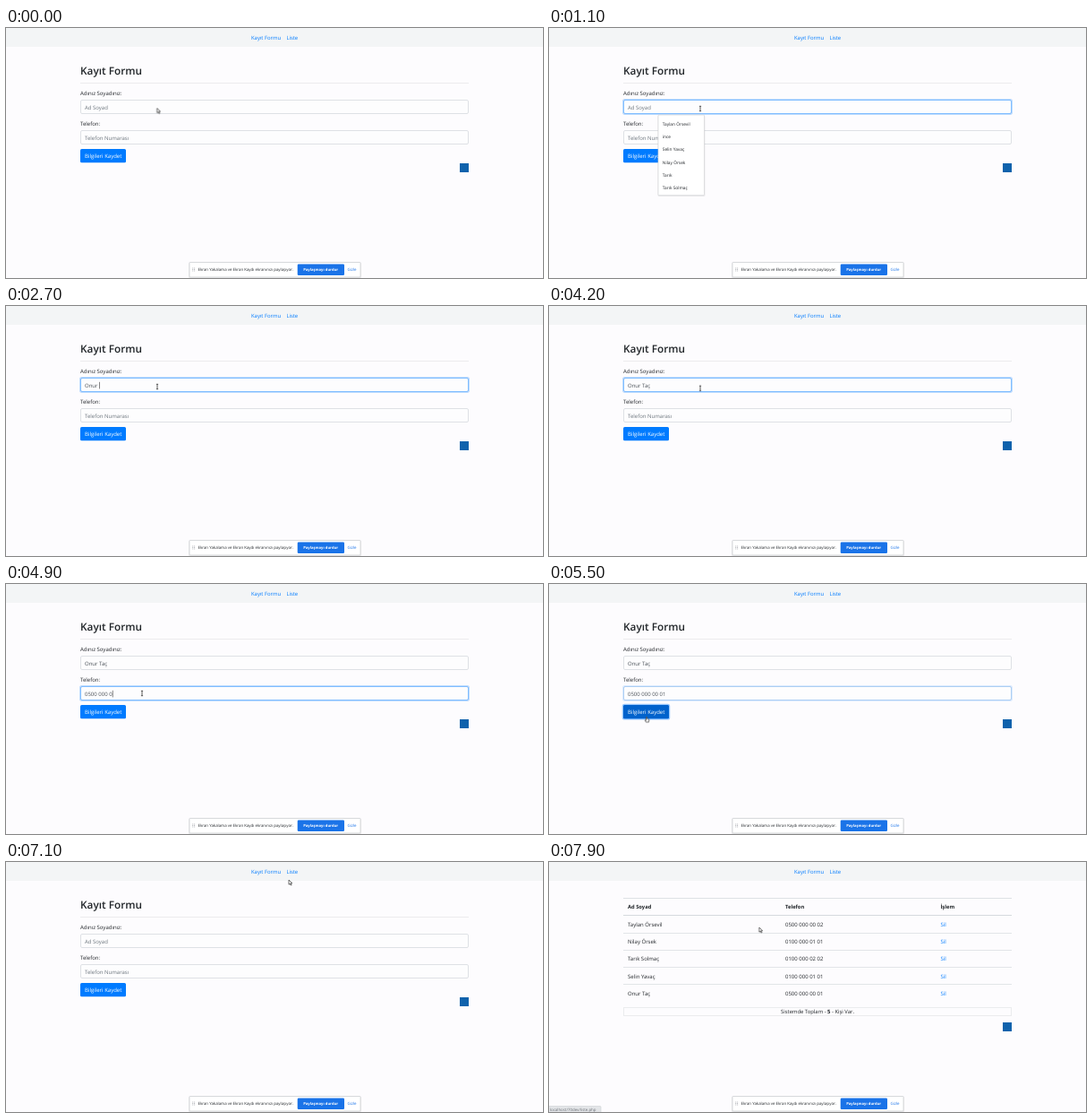
An HTML page that plays this animation: 600 px wide and 279 px high, repeating every 8 s.

```html
<!DOCTYPE html>
<html lang="tr">
<head>
<meta charset="utf-8">
<title>Kayıt Formu</title>
<style>
  html, body { margin: 0; width: 100%; height: 100%; overflow: hidden; background: #fdfcfe; }
  svg { display: block; }
  text {
    font-family: 'Open Sans', 'Noto Sans', sans-serif;
    white-space: pre;
    text-rendering: geometricPrecision;
  }
</style>
</head>
<body>
<svg id="stage" width="600" height="279" viewBox="0 0 600 279"></svg>
<script>
const LOOP = 8000;
const INK = '#212529', LINK = '#007bff', LINE = '#dee1e5', MUTED = '#6c757d', FIELD = '#495057';
const NAME = 'Onur Taç', PHONE = '0500 000 00 01';
const PEOPLE = [
  ['Taylan Örsevil', '0500 000 00 02'],
  ['Nilay Örsek', '0100 000 01 01'],
  ['Tarık Solmaç', '0100 000 02 02'],
  ['Selin Yavaç', '0100 000 01 01'],
  [NAME, PHONE]
];
// Key moments in ms
const FOCUS = 330, MENU = 620, TYPE = 1650, PHONE_FOCUS = 4450, PHONE_TYPE = 4600,
      CLICK = 5430, RELOAD = 5680, LIST = 7450;

const stage = document.getElementById('stage');

function add(parent, tag, attrs = {}) {
  const el = document.createElementNS('http://www.w3.org/2000/svg', tag);
  for (const k in attrs) el.setAttribute(k, attrs[k]);
  return parent.appendChild(el);
}
const group = parent => add(parent, 'g');
const rect = (parent, x, y, width, height, fill, more) =>
  add(parent, 'rect', { x, y, width, height, fill, ...more });
const path = (parent, d, more) => add(parent, 'path', { d, ...more });
function text(parent, x, y, str, more) {
  const el = add(parent, 'text', { x, y, 'font-size': 6, fill: INK, ...more });
  el.textContent = str;
  return el;
}

// Flips visibility at each time; `on` is the state at the loop start.
function toggle(el, on, times, fade = 0) {
  let v = on ? 1 : 0;
  const steps = [{ offset: 0, opacity: v }];
  for (const t of times) {
    steps.push({ offset: t / LOOP, opacity: v });
    v = 1 - v;
    steps.push({ offset: Math.min(1, (t + fade) / LOOP), opacity: v });
  }
  steps.push({ offset: 1, opacity: v });
  el.animate(steps, { duration: LOOP, iterations: Infinity });
  return el;
}

function nav() {
  rect(stage, 0, 0, 600, 21, '#f3f5f6');
  text(stage, 274, 13, 'Kayıt Formu', { fill: LINK, 'font-size': 5.9 });
  text(stage, 313.4, 13, 'Liste', { fill: LINK, 'font-size': 5.9 });
  const hover = toggle(group(stage), false, [7170, 7530]);
  text(hover, 313.4, 13, 'Liste', { fill: '#0056b3', 'font-size': 5.9, 'text-decoration': 'underline' });
}

function badge(parent, y) {
  rect(parent, 507, y, 10, 10, '#0f62ac');
}

function input(parent, y, label, hint, hintOff, focusOn, focusOff) {
  text(parent, 83, y - 5.5, label);
  const box = { x: 83.5, y: y + 0.5, rx: 1.5 };
  rect(parent, box.x, box.y, 433, 15, '#fdfdfe', { rx: 1.5, stroke: LINE });
  const ring = toggle(group(parent), false, [focusOn, focusOff], 150);
  rect(ring, 82.7, y - 0.3, 434.6, 16.6, 'none', { rx: 2, stroke: '#007bff', 'stroke-opacity': 0.25, 'stroke-width': 1.4 });
  rect(ring, box.x, box.y, 433, 15, 'none', { rx: 1.5, stroke: '#80bdff' });
  toggle(text(parent, 88, y + 10.8, hint, { fill: MUTED }), true, [hintOff, RELOAD]);
}

// One typed state with a caret that blinks until the next state.
function typed(parent, y, str, from, to, caretEnd) {
  const el = text(parent, 88, y, str.replace(/ /g, '\u00a0'), { fill: FIELD });
  toggle(el, false, [from, to]);
  const x = 88.3 + (str ? el.getComputedTextLength() : 0);
  const blinks = [];
  for (let t = from; t < caretEnd; t += 1000) blinks.push(t, Math.min(t + 500, caretEnd));
  toggle(rect(parent, x, y - 6, 0.6, 7.6, '#333'), false, blinks);
}

function typing(parent, y, states, caretEnd) {
  states.forEach(([t, str], i) => {
    const next = states[i + 1];
    typed(parent, y, str, t, next ? next[0] : RELOAD, next ? next[0] : caretEnd);
  });
}

function form() {
  const g = toggle(group(stage), true, [LIST]);
  text(g, 83, 52.3, 'Kayıt Formu', { 'font-size': 11.8, 'font-weight': 600 });
  rect(g, 83, 61, 434, 1, '#ececee');
  input(g, 80, 'Adınız Soyadınız:', 'Ad Soyad', TYPE, FOCUS, PHONE_FOCUS);
  input(g, 114, 'Telefon:', 'Telefon Numarası', PHONE_TYPE, PHONE_FOCUS, CLICK);

  const strokes = [FOCUS, TYPE, 1860, 2060, 2260, 2550, 3060, 3260, 3450];
  typing(g, 90.8, strokes.map((t, i) => [t, NAME.slice(0, i)]), PHONE_FOCUS);
  const dials = [[PHONE_FOCUS, '']];
  for (let i = 1, t = PHONE_TYPE; i <= PHONE.length; i++) {
    if (PHONE[i - 1] === ' ') continue;
    dials.push([t, PHONE.slice(0, i)]);
    t += 42;
  }
  typing(g, 124.8, dials, CLICK);

  rect(g, 83, 135, 51, 15.3, LINK, { rx: 1.6 });
  const hover = toggle(group(g), false, [5260, 6370], 100);
  rect(hover, 83, 135, 51, 15.3, '#0062cc', { rx: 1.6 });
  const ring = toggle(group(g), false, [CLICK, RELOAD]);
  rect(ring, 82.4, 134.4, 52.2, 16.5, 'none', { rx: 2, stroke: '#007bff', 'stroke-opacity': 0.4, 'stroke-width': 1.3 });
  text(g, 88, 145.2, 'Bilgileri Kaydet', { fill: '#fff' });
  badge(g, 151);

  const menu = toggle(group(g), false, [MENU, TYPE]);
  rect(menu, 121.5, 97.5, 53, 90.5, '#000', { rx: 1.5, opacity: 0.07 });
  rect(menu, 122, 97, 51.5, 89.7, '#fff', { rx: 1, stroke: '#d2d3d6', 'stroke-width': 0.7 });
  const items = [PEOPLE[0][0], 'ince', PEOPLE[3][0], PEOPLE[1][0], 'Tarık', PEOPLE[2][0]];
  items.forEach((s, i) => text(menu, 126.8, 109.2 + i * 14.1, s, { 'font-size': 4.8 }));
}

function list() {
  const g = toggle(group(stage), false, [LIST]);
  const cols = [88, 264, 437.4];
  rect(g, 83, 40, 434, 1, LINE);
  ['Ad Soyad', 'Telefon', 'İşlem'].forEach((s, i) =>
    text(g, cols[i], 52.2, s, { 'font-weight': 700, 'font-size': 5.8 }));
  rect(g, 83, 59, 434, 1, '#d6dade');
  PEOPLE.forEach(([name, phone], i) => {
    const y = 72.1 + i * 19.15;
    text(g, cols[0], y, name);
    text(g, cols[1], y, phone);
    text(g, cols[2], y, 'Sil', { fill: LINK });
    if (i) rect(g, 83, Math.round(59.6 + i * 19.15), 434, 1, '#e2e5e8');
  });
  rect(g, 83.5, 162.5, 433, 9, 'none', { stroke: '#ebecee' });
  const total = text(g, 300, 169.3, 'Sistemde Toplam - ', { 'text-anchor': 'middle', 'font-size': 5.9 });
  add(total, 'tspan', { 'font-weight': 700 }).textContent = '5';
  add(total, 'tspan').textContent = ' - Kişi Var.';
  badge(g, 179);
}

function shareBar() {
  rect(stage, 204, 261, 193, 19, '#000', { rx: 2, opacity: 0.07 });
  rect(stage, 205, 261.5, 191, 16.5, '#fff', { rx: 1, stroke: '#d0d2d5', 'stroke-width': 0.8 });
  path(stage, 'M208.7 267.5v4M210.6 267.5v4', { stroke: '#a5a8ac', 'stroke-width': 0.8, 'stroke-dasharray': '1 .5' });
  text(stage, 214.5, 271.2, 'Ekran Yakalama ve Ekran Kaydı ekranınızı paylaşıyor.', { 'font-size': 4.38 });
  rect(stage, 325.7, 263.5, 52.3, 12.5, '#1a73e8', { rx: 1.3 });
  text(stage, 351.7, 271.2, 'Paylaşmayı durdur', { 'font-size': 4.15, 'font-weight': 700, fill: '#fff', 'text-anchor': 'middle' });
  text(stage, 381.6, 271.2, 'Gizle', { 'font-size': 4.4, fill: '#1a73e8' });
}

function statusBar() {
  const g = toggle(group(stage), false, [7220]);
  rect(g, -1, 272.5, 59, 8, '#e3e5e8', { rx: 1, stroke: '#cdd0d4', 'stroke-width': 0.6 });
  text(g, 1, 278, 'localhost/70dev/liste.php', { 'font-size': 4.4, fill: '#6b6f75' });
}

function pointer() {
  const g = group(stage);
  const moves = [
    [0, 168.7, 89.5], [200, 169, 90], [3900, 169, 90], [4150, 169, 91.5], [4250, 169, 92],
    [4430, 152, 122], [5040, 152, 122], [5350, 109, 148.5], [6300, 109, 148.5],
    [6700, 215, 80], [7050, 316, 20], [7110, 316, 20], [7220, 319, 11], [7460, 319, 11],
    [7860, 234.8, 73], [LOOP, 234.8, 73]
  ];
  g.animate(moves.map(([t, x, y]) => ({
    offset: t / LOOP, transform: `translate(${x}px, ${y}px)`, easing: 'ease-in-out'
  })), { duration: LOOP, iterations: Infinity });

  const arrow = 'M0 0V5.2L1.3 4.1L2.2 6L3.1 5.6L2.2 3.7H3.8Z';
  const hand = 'M-.5 0Q.1 -.6 .6 0V2L2.5 2.4Q3 2.6 2.9 3.4L2.4 5.6H-.6L-2 3.6Q-1.7 2.9 -.5 3.7Z';
  const beam = 'M-1.1 -2.7H1.1M0 -2.7V2.7M-1.1 2.7H1.1';
  const solid = { fill: '#fff', stroke: '#333', 'stroke-width': 0.7 };
  toggle(path(g, arrow, solid), true, [250, 6370, 7180, 7530]);
  toggle(path(g, beam, { fill: 'none', stroke: '#333', 'stroke-width': 0.8 }), false, [250, 5260]);
  toggle(path(g, hand, solid), false, [5260, 6370, 7180, 7530]);
}

nav();
form();
list();
shareBar();
statusBar();
pointer();
</script>
</body>
</html>
```
